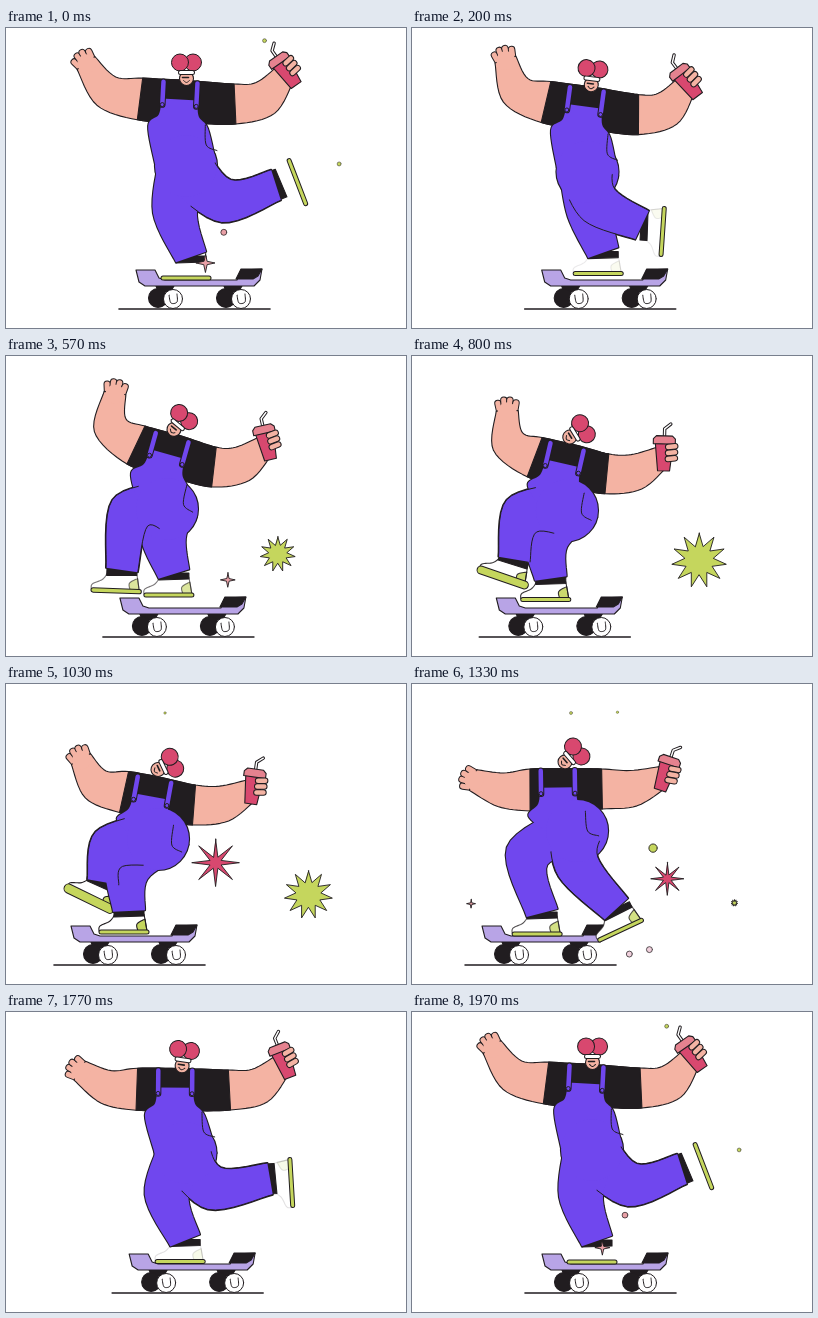
Recreate the animation shown at these times as an HTML page with a canvas. Size 400 by 300 pixels, loop 2010 ms.

```html
<!DOCTYPE html>
<html lang="en">
<head>
<meta charset="utf-8">
<title>Skater</title>
<style>
html, body { margin: 0; width: 100%; height: 100%; overflow: hidden; background: #fff; }
canvas { display: block; }
</style>
</head>
<body>
<canvas id="stage" width="400" height="300"></canvas>
<script>
const c = document.getElementById('stage').getContext('2d');
const LOOP = 2010;
const INK = '#211d20', BLUE = '#7047ee', SKIN = '#f4b3a3', PINK = '#d8486f',
  LIME = '#c5d65d', LILAC = '#b8a4e6', WHITE = '#fff', BLUSH = '#e9a0a6';

// Joints per pose: arms = cuff and wrist (left, right); legs = knee and ankle;
// feet = tilt of each foot. Leg S swings forward while leg T stands.
const nums = s => s.match(/-?\d+/g).map(Number);
const pose = (at, arms, hip, legS, legT, feet, board) =>
  ({ at, arms: nums(arms), hip, legS: nums(legS), legT: nums(legT), footS: [feet[0]], footT: [feet[1]], board: [board] });
const poses = [
  pose(0, '134,71 80,35 229,76 279,46', [180, 138], '220,173 270,157', '169,184 185,229', [-111, 0], 193),
  pose(370, '134,79 106,29 222,100 267,73', [169, 150], '149,180 175,228', '184,186 196,220', [-49, 0], 192),
  pose(570, '130,89 109,37 208,111 259,90', [161, 153], '124,157 116,214', '158,185 168,218', [2, 0], 177),
  pose(1030, '118,108 75,75 188,121 245,106', [152, 155], '103,165 97,198', '121,187 123,227', [26, 0], 128),
  pose(1330, '118,106 61,96 190,105 251,93', [165, 147], '115,172 130,229', '166,183 204,225', [0, -25], 133),
  pose(1570, '125,89 65,88 212,83 270,66', [178, 145], '144,180 166,228', '188,181 250,187', [0, -62], 171)
];
// The legs trade roles every loop, and the last pose is held briefly.
const rest = { ...poses[0], legS: poses[0].legT, legT: poses[0].legS, footS: poses[0].footT, footT: poses[0].footS };
const keys = [{ ...poses[0], at: -40 }, ...poses, { ...rest, at: LOOP - 40 }, { ...rest, at: LOOP }];

// Smooth interpolation through the poses without overshoot.
function poseAt(t) {
  let i = 1;
  while (i < keys.length - 2 && t >= keys[i + 1].at) i++;
  const a = keys[i], b = keys[i + 1], h = b.at - a.at, u = (t - a.at) / h;
  const tangent = (x, y) => x * y > 0 ? 2 * x * y / (x + y) : 0;
  const blend = (k, n) => {
    const slope = j => keys[j + 1] ? (keys[j + 1][k][n] - keys[j][k][n]) / (keys[j + 1].at - keys[j].at) : 0;
    const m0 = tangent(slope(i - 1), slope(i)), m1 = tangent(slope(i), slope(i + 1));
    return a[k][n] + (b[k][n] - a[k][n]) * u * u * (3 - 2 * u) + h * u * (1 - u) * ((1 - u) * m0 - u * m1);
  };
  const out = {};
  for (const k in a) if (k !== 'at') out[k] = a[k].map((_, n) => blend(k, n));
  return out;
}

// Points
const pairs = a => a.flatMap((v, i) => i % 2 ? [] : [[v, a[i + 1]]]);
const mix = (a, b, u) => a.map((v, i) => v + (b[i] - v) * u);
const unit = (a, b) => {
  const d = Math.hypot(b[0] - a[0], b[1] - a[1]) || 1;
  return [(b[0] - a[0]) / d, (b[1] - a[1]) / d];
};
const offset = (p, [dx, dy], along, across) =>
  [p[0] + dx * along - dy * across, p[1] + dy * along + dx * across];

const STEPS = 8;
function spline(pts) {
  const out = [pts[0]];
  for (let i = 0; i < pts.length - 1; i++) {
    const p = pts[i], q = pts[i + 1], o = pts[i - 1] || p, r = pts[i + 2] || q;
    for (let s = 1; s <= STEPS; s++) {
      const u = s / STEPS, e = u * u * (3 - 2 * u);
      out.push(p.map((v, k) => v + (q[k] - v) * e
        + u * (1 - u) * ((1 - u) * (q[k] - o[k]) - u * (r[k] - v)) / 2));
    }
  }
  return out;
}
// Both edges of a tapered tube along some joints.
function edges(pts, radii) {
  const side = sign => spline(pts.map((p, i) =>
    offset(p, unit(pts[i - 1] || p, pts[i + 1] || p), 0, sign * radii[i])));
  return [side(1), side(-1)];
}

// Paths
const line = pts => {
  const path = new Path2D();
  pts.forEach(p => path.lineTo(...p));
  return path;
};
const poly = pts => {
  const path = line(pts);
  path.closePath();
  return path;
};
const between = ([a, b]) => poly([...a, ...b.slice().reverse()]);
const disc = (x, y, r) => {
  const path = new Path2D();
  path.arc(x, y, r, 0, 7);
  return path;
};
function stroke(path, width = 1.1, color = INK) {
  c.lineWidth = width;
  c.strokeStyle = color;
  c.stroke(path);
}
function shape(path, fill, width = 1.1) {
  c.fillStyle = fill;
  c.fill(path);
  if (width) stroke(path, width);
}
function bar(pts, color, width) {
  stroke(line(pts), width + 2);
  stroke(line(pts), width, color);
}
function placed([x, y], deg, draw) {
  c.save();
  c.translate(x, y);
  c.rotate(deg * Math.PI / 180);
  draw();
  c.restore();
}

function drawBoard() {
  stroke(line([[-80, 281], [71, 281]]), 1.6);
  for (const x of [-34, 34]) {
    shape(poly([[x - 9, 258], [x + 9, 258], [x + 3, 268], [x - 5, 268]]), INK);
    shape(disc(x - 7, 270, 9.5), INK);
    shape(disc(x + 8, 271, 9.5), WHITE, 1);
    stroke(line(spline([[x + 4, 267], [x + 6, 275], [x + 12, 274], [x + 12, 266]])), 1);
  }
  shape(poly([[-63, 242], [-44, 242], [-40, 250], [-34, 252], [38, 252], [42, 242],
    [63, 241], [61, 252], [55, 258], [-54, 258], [-60, 254]]), LILAC);
  shape(poly([[37, 251], [42, 241], [63, 241], [59, 248], [54, 251]]), INK);
}

// A shoe hanging below its ankle, toe to the left; a raised toe shows more sole.
function drawShoe(tilt, outline) {
  const upper = poly(spline([[-14, 3], [-19, 10], [-29, 15], [-30, 20]]).concat([[18, 20], [15, 3]]));
  shape(upper, WHITE, 0);
  c.globalAlpha = outline;
  shape(poly(spline([[16, 8], [8, 13], [9, 20]]).concat([[18, 20]])), LIME);
  stroke(upper);
  c.globalAlpha = 1;
  shape(poly([[-15, -1], [15, -1], [15, 5], [-15, 6]]), INK);
  bar([[-28, 21], [18, 21]], LIME, 3 + Math.max(0, tilt) * .2);
}

function drawHead() {
  shape(disc(0, 0, 7), SKIN);
  for (const x of [6.5, -6.5]) shape(disc(x, -16, 8.5), PINK, 1);
  bar([[-6, -6], [6, -6]], WHITE, 3);
  stroke(line([[-4, -1], [2, -1]]), 1.6);
  stroke(line(spline([[-3, 2], [0, 4], [3, 2]])), 1);
}

function drawCup() {
  bar([[0, -17], [0, -26], [6, -31]], WHITE, 1.4);
  shape(poly([[-9, -12], [9, -12], [6, 16], [-6, 16]]), PINK);
  shape(poly([[-11, -16], [-8, -19], [8, -19], [11, -16], [11, -11], [-11, -11]]), '#e5828f');
  for (const y of [-8, -2, 4]) bar([[4, y], [11, y - 1]], SKIN, 4.5);
}

function drawHand(wrist, dir) {
  for (let i = -1.5; i < 2; i++) {
    const tip = 11 - i * i * 1.5;
    bar([offset(wrist, dir, 0, i * 5), offset(wrist, dir, tip, i * 6)], SKIN, 5.5);
  }
}

// The elbow drops further the higher the hand is raised.
function elbow(cuff, wrist, side) {
  return offset(mix(cuff, wrist, .5), unit(cuff, wrist), 0, side * (2 + .28 * (cuff[1] - wrist[1])));
}

function drawSkater(t) {
  const p = poseAt(t), turn = Math.sin(Math.PI * t / LOOP) ** 2;
  const [cuffL, wristL, cuffR, wristR] = pairs(p.arms);
  const elbowL = elbow(cuffL, wristL, -1), elbowR = elbow(cuffR, wristR, 1);
  const chest = mix(cuffL, cuffR, .5), slope = unit(cuffL, cuffR);

  placed([p.board[0], 0], 0, drawBoard);
  for (const k of ['T', 'S']) {
    const [tilt] = p['foot' + k];
    placed(p['leg' + k].slice(2), tilt, () => drawShoe(tilt, turn));
  }

  // Arms and shirt are one tube from wrist to wrist.
  const sleeves = edges([wristL, elbowL, cuffL, chest, cuffR, elbowR, wristR], [11, 17, 21, 21, 20, 18, 11]);
  const handDir = unit(elbowL, wristL);
  drawHand(wristL, handDir);
  shape(between(sleeves), SKIN);
  shape(disc(...offset(wristL, handDir, -1, 0), 9.5), SKIN, 0);
  shape(between(sleeves.map(s => s.slice(2 * STEPS, 4 * STEPS + 1))), INK);
  placed([chest[0] - 1, chest[1] - 23 - 6 * turn], 65 * turn, drawHead);

  // Overalls: bib, hips and two legs merge into one outline.
  const bib = [chest[0] - 8, chest[1]];
  const local = (x, y) => offset(bib, slope, x, y);
  const flank = side => spline([local(side * 18, -2), local(side * 20, 14),
    local(side * 30, 26), offset(p.hip, slope, side * 31, 0)]);
  const legs = [p.legT, p.legS].map(leg => edges([p.hip, ...pairs(leg)], [28, 22, 16]));
  const cloth = [...legs.map(between), between([flank(-1), flank(1)]), disc(...p.hip, 31)];
  cloth.forEach(part => stroke(part, 2.2));
  cloth.forEach(part => shape(part, BLUE, 0));
  legs[t < 1200 ? 1 : 0].forEach(edge => stroke(line(edge.slice(4)), 1));
  stroke(line(spline([local(27, 22), local(29, 42), local(40, 47)])), 1);
  for (const x of [-17, 17]) {
    bar([local(x, -19), local(x, 4)], BLUE, 4.5);
    shape(disc(...local(x, 4), 2), BLUE, 1);
  }

  const reach = unit(elbowR, wristR);
  const lift = Math.atan2(-reach[1], reach[0]) * 180 / Math.PI;
  placed([wristR[0] + 2, wristR[1] - 2], 56 - 1.8 * lift, drawCup);
}

const star = (points, inner) => (x, y, r) => poly(Array.from({ length: points * 2 }, (_, i) => {
  const a = i * Math.PI / points - Math.PI / 2, d = i % 2 ? r * inner : r;
  return [x + d * Math.cos(a), y + d * Math.sin(a)];
}));
const spiky = star(8, .25), burst = star(11, .52), spark = star(4, .25);

// Each bit drifts in a straight line while it grows and shrinks:
// shape, colour, size, start, end, from, to, skew of the growth.
const bits = [
  [spiky, PINK, 24, 850, 1690, [182, 169], [310, 214], .5],
  [burst, LIME, 28, 350, 1370, [257, 192], [325, 220]],
  [spiky, PINK, 6, 230, 510, [112, 160], [90, 168]],
  [spark, BLUSH, 10, 1890, 2190, [172, 237], [240, 232]],
  [spark, BLUSH, 8, 2250, 2780, [263, 232], [197, 219]],
  [spark, BLUSH, 8, 1230, 1760, [48, 217], [106, 231]],
  [disc, LIME, 2.5, 950, 1430, [159, 29], [159, 29]],
  [disc, LIME, 2.5, 1250, 1750, [193, 31], [270, 14]],
  [disc, LIME, 2, 1850, 2130, [243, 19], [270, 8]],
  [disc, LIME, 7, 1250, 1650, [219, 170], [328, 141]],
  [disc, LIME, 2, 1850, 2150, [309, 144], [354, 129]],
  [disc, BLUSH, 3, 1830, 2170, [196, 199], [237, 209]],
  [disc, '#f0d0dc', 3, 1230, 1450, [210, 271], [226, 269]],
  [disc, '#f0d0dc', 3, 1230, 1450, [231, 267], [245, 264]],
  [null, BLUE, 9, 1450, 1720, [280, 105], [321, 94]],
  [null, BLUSH, 4, 1450, 1720, [318, 130], [341, 124]],
  [null, LILAC, 4, 1450, 1720, [327, 197], [347, 191]]
];
function drawBit([path, color, size, start, end, from, to, skew = 1], t) {
  if (t < start) t += LOOP;
  if (t < start || t >= end) return;
  const u = (t - start) / (end - start), r = size * Math.sin(Math.PI * u ** skew);
  const [x, y] = mix(from, to, u);
  if (path) shape(path(x, y, r), color, Math.min(.9, r * .25));
  else bar([[x - r, y + r * .3], [x + r, y - r * .3]], color, 2);
}

const begin = performance.now();
function tick() {
  const t = (performance.now() - begin) % LOOP;
  c.fillStyle = WHITE;
  c.fillRect(0, 0, 400, 300);
  c.lineJoin = c.lineCap = 'round';
  drawSkater(t);
  bits.forEach(bit => drawBit(bit, t));
  requestAnimationFrame(tick);
}
tick();
</script>
</body>
</html>
```
